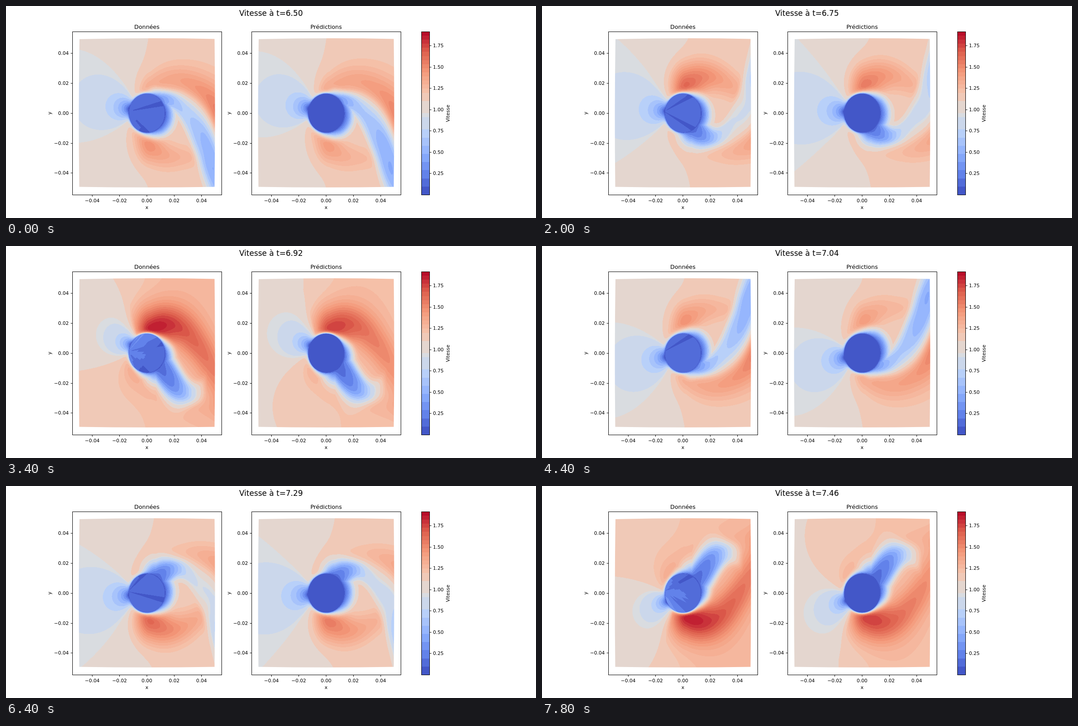
Recreate the animation shown at these times as an HTML page with a canvas. Size 1183x473 px, loop 8000 ms.

```html
<!DOCTYPE html>
<html lang="fr">
<head>
<meta charset="utf-8">
<title>Vitesse</title>
<style>
html, body { margin: 0; width: 100%; height: 100%; overflow: hidden; background: #fff; }
canvas { display: block; }
</style>
</head>
<body>
<canvas id="stage" width="1183" height="473"></canvas>
<script>
const ctx = document.getElementById('stage').getContext('2d');
const FRAMES = 40, STEP_MS = 200;
const LEFT = 162, TOP = 72, W = 305, H = 333;     // field area of the first panel
const CX = 314.5, CY = 239, RX = 39.9, RY = 43.3; // cylinder
const PANEL_DX = 400, VMAX = 1.916, LEVELS = 40;
const cosDeg = deg => Math.cos(deg * Math.PI / 180);

// ---- colours -------------------------------------------------------------
const COOLWARM = [[59, 76, 192], [98, 130, 234], [141, 176, 254], [184, 208, 249], [221, 221, 221],
  [245, 196, 173], [244, 154, 123], [222, 96, 77], [180, 4, 38]];

function colourAt(f) {
  const p = f * 8, i = Math.min(7, Math.floor(p));
  return COOLWARM[i].map((c, k) => Math.round(c + (COOLWARM[i + 1][k] - c) * (p - i)));
}

// Blue levels share a colour in pairs, the pale middle in wider groups.
const edges = [];
for (let i = 0; i < 16; i += 2) edges.push(i);
edges.push(16, 19, 20, 23);
for (let i = 25; i <= LEVELS; i++) edges.push(i);

const bands = [];
for (let e = 0; e + 1 < edges.length; e++) {
  const colour = colourAt((edges[e] + edges[e + 1]) / 2 / LEVELS);
  for (let i = edges[e]; i < edges[e + 1]; i++) bands[i] = colour;
}
const bandOf = v => bands[Math.max(0, Math.min(LEVELS - 1, Math.floor(v / VMAX * LEVELS)))];

// ---- speed field, lengths in cylinder radii, phase in degrees --------------
// A ridge is a curve y(x) with a height and a width, sampled at one column.
function ridge(x, start, shape) {
  const xs = Math.max(x, start), here = shape(xs);
  const slope = (shape(xs + .02).y - here.y) / .02;
  return { ...here, dx: x - xs, stretch: Math.hypot(1, slope) };
}
function ridgeValue({ y, height, width, dx, stretch }, py, power) {
  const d = Math.hypot((py - y) / stretch, dx) / width;
  return height * Math.exp(-Math.pow(d, power));
}

// The wake sways as a wave that grows downstream; slow cores travel along it.
const wakeShape = phase => x => {
  const core = cosDeg(2 * (phase + 77 - 38 * x));
  const speed = .08 + .21 * x - (.02 + .1 * x) * core;
  return {
    y: -(.15 + .86 * x) * cosDeg(phase + 98 - 35 * x),
    height: Math.max(0, 1 - speed / 1.15),
    width: .65 + .2 * core
  };
};

// The fast jet above the body; the one below is its mirror half a cycle later.
const jetShape = (phase, gain) => x => {
  const pulse = Math.pow((1 + cosDeg(phase + 50 - 20 * x)) / 2, 1.6);
  const height = .03 + .46 * pulse;
  return {
    y: 1.5 + .6 * x - .19 * x * x - (.35 + .14 * x * x) * cosDeg(phase),
    height: height * gain,
    width: .5 + 1.1 * height
  };
};

function makeFlow(phase, predicted) {
  const sway = cosDeg(phase), tilt = .576 * sway;
  const ca = Math.cos(tilt), sa = Math.sin(tilt);
  const surge = sway * sway * (predicted ? .85 : 1);
  const gain = predicted ? .88 : 1;
  const free = .96 + .26 * surge, drift = .085 - .04 * surge;
  const wake = wakeShape(phase);
  const upper = jetShape(phase, gain), lower = jetShape(phase + 180, gain);

  function inside(x, y) {
    if (predicted) return .06;
    const fan = Math.floor(Math.atan2(y - .08, x + 1.05) * 7 + 20);
    const noise = Math.abs(Math.sin(fan * 12.99 + Math.round(phase) * .7));
    const upwind = Math.max(0, .25 - x * .5 + y * .5 * Math.sign(sway));
    return .07 + .09 * noise + .25 * surge * upwind;
  }

  // Returns the speed as a function of y for one column.
  return function column(x) {
    const wakeHere = ridge(x, .5, wake);
    const upperHere = ridge(x, .2, upper), lowerHere = ridge(x, .2, lower);
    const shear = drift * (1 + Math.tanh(x / 1.2));

    return y => {
      const r2 = x * x + y * y;
      if (r2 < 1) return inside(x, y);
      // Potential flow round the cylinder, without its rear stagnation zone.
      const u = x * ca - y * sa, v = x * sa + y * ca;
      let ratio = Math.sqrt(Math.max(0, 1 - 2 * (u * u - v * v) / (r2 * r2) + 1 / (r2 * r2)));
      if (ratio > 1) ratio = 1 + (ratio - 1) * .35;
      else ratio = u > 0 ? 1 : 1 - Math.pow(1 - ratio, .85);

      let speed = free * ratio + shear;
      speed += ridgeValue(upperHere, y, 2) + ridgeValue(lowerHere, -y, 2);
      const rear = .88 * Math.exp(-Math.pow(Math.hypot(x - .4 * ca, y + .55 * sa) / 1.1, 5));
      speed *= 1 - Math.max(rear, ridgeValue(wakeHere, y, 3));
      return Math.max(.06, speed * (1 - .9 * Math.exp((1 - Math.sqrt(r2)) / .06)));
    };
  };
}

const buffer = document.createElement('canvas');
buffer.width = W;
buffer.height = H;
const bufferCtx = buffer.getContext('2d');
const image = bufferCtx.createImageData(W, H);
image.data.fill(255);

function paintField(phase, predicted) {
  const column = makeFlow(phase, predicted);
  for (let px = 0; px < W; px++) {
    const speedAt = column((LEFT + px + .5 - CX) / RX);
    for (let py = 0; py < H; py++) {
      const colour = bandOf(speedAt((CY - TOP - py - .5) / RY));
      const o = 4 * (py * W + px);
      for (let c = 0; c < 3; c++) image.data[o + c] = colour[c];
    }
  }
  bufferCtx.putImageData(image, 0, 0);
}

function drawField(dx) {
  ctx.save();
  ctx.translate(dx, 0);
  ctx.beginPath();
  ctx.moveTo(164, 74);
  ctx.quadraticCurveTo(314, 70.5, 465.5, 73.5);
  ctx.quadraticCurveTo(467.5, 239, 465.5, 403.5);
  ctx.quadraticCurveTo(314, 406, 163.5, 403.5);
  ctx.quadraticCurveTo(161.5, 239, 164, 74);
  ctx.clip();
  ctx.drawImage(buffer, LEFT, TOP);
  ctx.restore();
}

// ---- axes and labels -----------------------------------------------------
function text(str, x, y, size, align = 'center') {
  ctx.font = size + 'px "DejaVu Sans", sans-serif';
  ctx.textAlign = align;
  ctx.fillText(str, x, y);
}
function sideText(str, x, y, size) {
  ctx.save();
  ctx.translate(x, y);
  ctx.rotate(-Math.PI / 2);
  text(str, 0, 0, size);
  ctx.restore();
}
function line(x1, y1, x2, y2) {
  ctx.beginPath();
  ctx.moveTo(x1, y1);
  ctx.lineTo(x2, y2);
  ctx.stroke();
}

function drawAxes(dx, title) {
  ctx.save();
  ctx.translate(dx, 0);
  ctx.strokeRect(148.5, 57.5, 333, 364);
  text(title, 314.5, 50.5, 12.8);
  for (let i = -2; i <= 2; i++) {
    const label = (i < 0 ? '\u2212' : '') + (Math.abs(i) * .02).toFixed(2);
    const x = 314.5 + 61 * i, y = Math.round(238.8 - 66.8 * i) + .5;
    line(x, 421.5, x, 425.5);
    text(label, x, 437.5, 10.7);
    line(144.5, y, 148.5, y);
    text(label, 140, y + 3.5, 10.7, 'right');
  }
  text('x', 314.5, 453, 10.7);
  sideText('y', 100.5, 239, 10.7);
  ctx.restore();
}

function drawColourBar() {
  const yOf = v => 421 - v / VMAX * 364;
  for (let i = 0; i < LEVELS; i++) {
    const top = Math.round(yOf((i + 1) * VMAX / LEVELS)), bottom = Math.round(yOf(i * VMAX / LEVELS));
    ctx.fillStyle = `rgb(${bands[i]})`;
    ctx.fillRect(928, top, 18, bottom - top);
  }
  ctx.fillStyle = '#000';
  ctx.strokeRect(927.5, 57.5, 18, 364);
  for (let v = .25; v < 1.8; v += .25) {
    const y = Math.round(yOf(v) - .5) + .5;
    line(945.5, y, 949.5, y);
    text(v.toFixed(2), 953, y + 3.5, 10.7, 'left');
  }
  sideText('Vitesse', 990, 239.5, 10.7);
}

function drawFrame(k) {
  ctx.fillStyle = '#fff';
  ctx.fillRect(0, 0, 1183, 473);
  const phase = 57.3 * (k - 5) - 5;
  ['Données', 'Prédictions'].forEach((title, n) => {
    paintField(phase - 4 * n, n === 1);
    drawField(n * PANEL_DX);
    ctx.fillStyle = ctx.strokeStyle = '#000';
    ctx.lineWidth = 1;
    drawAxes(n * PANEL_DX, title);
  });
  drawColourBar();
  text('Vitesse à t=' + (6.503 + .0246 * k).toFixed(2), 591.5, 22, 17.1);
}

let shown = -1;
function tick() {
  const k = Math.floor(performance.now() / STEP_MS) % FRAMES;
  if (k !== shown) drawFrame(shown = k);
  requestAnimationFrame(tick);
}
tick();
</script>
</body>
</html>
```
